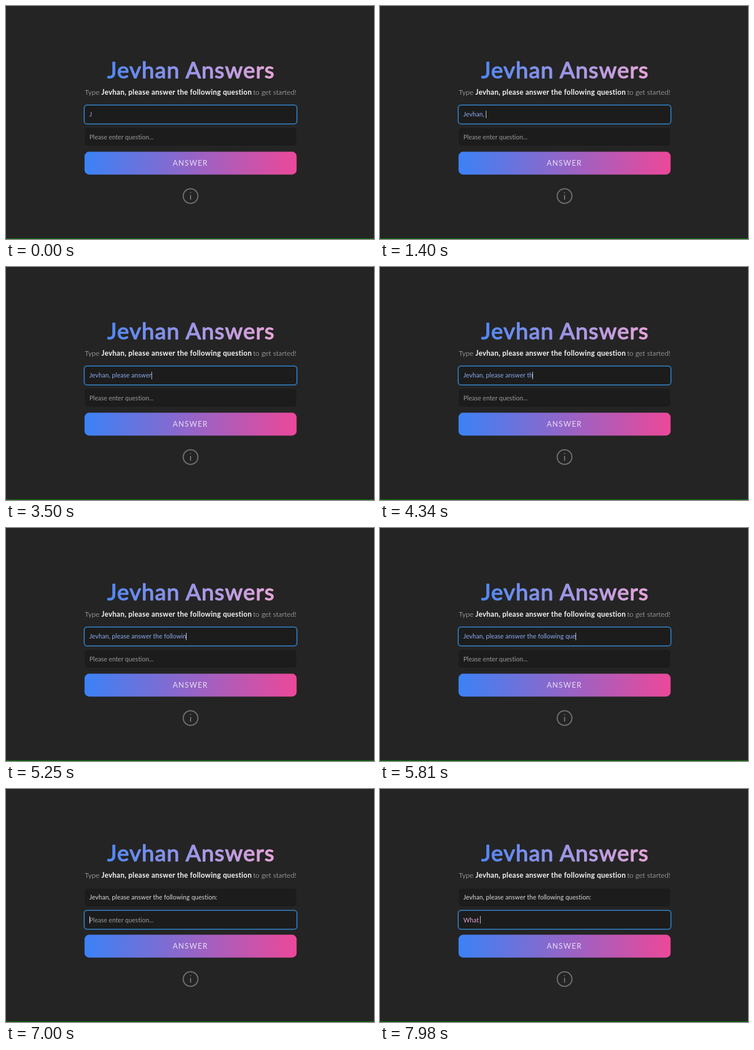
Recreate the animation shown at these times as an HTML page. Size 640 px wide and 407 px high, loop 8000 ms.

```html
<!DOCTYPE html>
<html lang="en">
<head>
<meta charset="utf-8">
<title>Jevhan Answers</title>
<style>
  html, body { margin: 0; width: 100%; height: 100%; overflow: hidden; background: #242424; }
  svg { display: block; width: 100%; height: 100%; }
  text { font-family: Lato, "Open Sans", sans-serif; white-space: pre; }
  .title {
    font-size: 39px; letter-spacing: 1.2px; text-anchor: middle;
    fill: url(#heading); stroke: url(#heading); stroke-width: 1.4; stroke-linejoin: round;
  }
  .lead { font-size: 12.4px; font-weight: 300; fill: #dcdcdc; }
  .lead .strong { font-weight: 700; fill: #f6f6f6; letter-spacing: .3px; }
  .end { text-anchor: end; }
  .box { fill: #1c1c1c; }
  .ring { fill: none; stroke: #2f6fa6; stroke-width: 2; visibility: hidden; }
  .value { font-size: 10.9px; letter-spacing: .1px; fill: #dcdcdc; }
  .hint { font-size: 10.9px; letter-spacing: .05px; fill: #9c9c9c; }
  .focus .ring { visibility: visible; }
  .focus.first .value { fill: #8eaaf0; }
  .focus.second .value { fill: #e3a3d6; }
  .label { font-size: 12.8px; letter-spacing: 1.2px; fill: #e9def5; }
  .info { fill: none; stroke: #707070; stroke-width: 2; stroke-linecap: round; }
  #caret { fill: #c2c8d2; }
</style>
</head>
<body>
<svg viewBox="0 0 640 407">
  <defs>
    <linearGradient id="heading" gradientUnits="userSpaceOnUse" x1="137" x2="505" y1="0" y2="0">
      <stop stop-color="#3b82f6"/><stop offset="1" stop-color="#f9a8d4"/>
    </linearGradient>
    <linearGradient id="button">
      <stop stop-color="#3b82f6"/><stop offset="1" stop-color="#ec4899"/>
    </linearGradient>
  </defs>
  <rect width="640" height="407" fill="#242424"/>
  <rect y="406" width="640" height="1" fill="#008000"/>

  <text class="title" x="322" y="126">Jevhan Answers</text>
  <g class="lead">
    <text x="137" y="155">Type</text>
    <text class="strong" x="166" y="155">Jevhan, please answer the following question</text>
    <text class="end" x="505" y="155">to get started!</text>
  </g>

  <g id="first" class="first">
    <rect class="box" x="137" y="174" width="368" height="31" rx="5"/>
    <rect class="ring" x="136" y="173" width="370" height="33" rx="5"/>
    <text class="value" x="145" y="193"></text>
  </g>
  <g id="second" class="second">
    <rect class="box" x="137" y="213" width="368" height="31" rx="5"/>
    <rect class="ring" x="136" y="212" width="370" height="33" rx="5"/>
    <text class="hint" x="145" y="232.5">Please enter question...</text>
    <text class="value" x="145" y="232.5"></text>
  </g>
  <rect id="caret" width="1" height="13"/>

  <rect x="136.6" y="254.6" width="368.8" height="39.8" rx="8" fill="url(#button)"/>
  <text class="label" x="290" y="279">ANSWER</text>

  <g class="info">
    <circle cx="321" cy="332" r="12.8"/>
    <path d="M321 331v6.5M321 326v.1"/>
  </g>
</svg>
<script>
  const LOOP = 8000, BLINK = 530, FOCUS_SHIFT = 6860;
  const phrase = "Jevhan, please answer the following question:";
  const question = "What ";

  // Typing rhythm: [time of key, characters typed], evenly spaced in between
  const phraseBeats = [[-570, 1], [350, 2], [560, 3], [1330, 8], [1540, 9], [2520, 17],
    [2800, 19], [3150, 20], [3640, 22], [3990, 23], [4200, 24], [4410, 25], [4480, 26],
    [4620, 27], [5180, 34], [5320, 35], [5460, 36], [6300, 44], [6440, 45]];
  const questionBeats = [[FOCUS_SHIFT, 0], [7210, 1], [7420, 2], [7700, 4], [7910, 5]];

  const keyTimes = beats => {
    const keys = [beats[0]];
    for (let i = 1; i < beats.length; i++) {
      const [t0, n0] = beats[i - 1], [t1, n1] = beats[i];
      for (let n = n0 + 1; n <= n1; n++) keys.push([t0 + (t1 - t0) * (n - n0) / (n1 - n0), n]);
    }
    return keys;
  };

  const field = (id, text, beats, caretTop) => {
    const box = document.getElementById(id);
    return { box, text, caretTop, keys: keyTimes(beats),
      value: box.querySelector(".value"), hint: box.querySelector(".hint") };
  };
  const first = field("first", phrase, phraseBeats, 183);
  const second = field("second", question, questionBeats, 222);
  const caret = document.getElementById("caret");

  function fill(f, t) {
    const [time, count] = f.keys.filter(k => k[0] <= t + 0.5).pop() || [0, 0];
    const shown = f.text.slice(0, count);
    if (f.value.textContent !== shown) f.value.textContent = shown;
    if (f.hint) f.hint.style.visibility = count ? "hidden" : "visible";
    return time;
  }

  function draw(t) {
    const lastKeys = [fill(first, t), fill(second, t)];
    const onSecond = t >= FOCUS_SHIFT;
    const active = onSecond ? second : first;
    first.box.classList.toggle("focus", !onSecond);
    second.box.classList.toggle("focus", onSecond);

    const idle = t - lastKeys[+onSecond];
    const width = active.value.textContent ? active.value.getComputedTextLength() : 0;
    caret.setAttribute("x", Math.floor(145 + width));
    caret.setAttribute("y", active.caretTop);
    caret.style.visibility = Math.floor(idle / BLINK) % 2 ? "hidden" : "visible";
  }

  const start = performance.now();
  function tick(now) {
    draw(Math.max(0, now - start) % LOOP);
    requestAnimationFrame(tick);
  }
  draw(0);
  requestAnimationFrame(tick);
</script>
</body>
</html>
```
